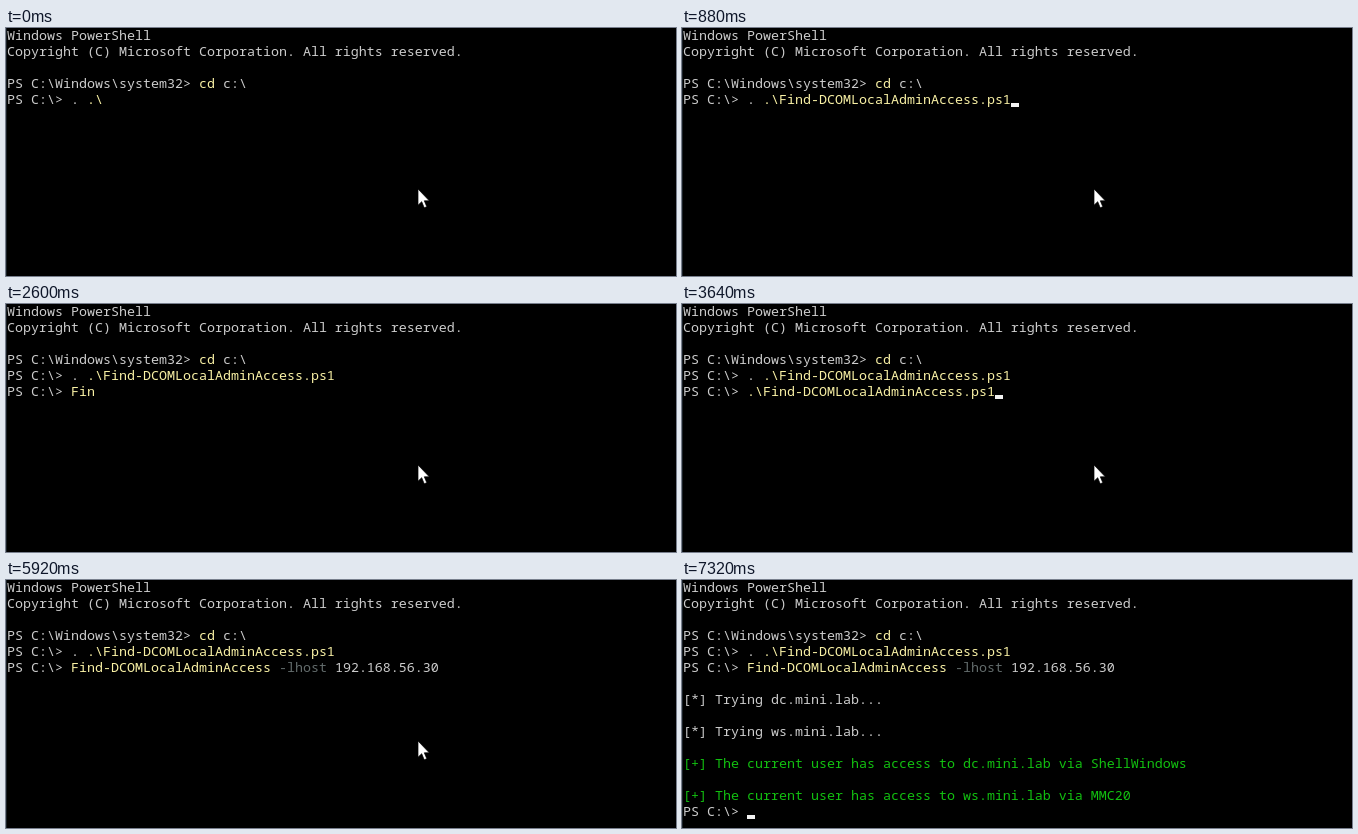
Animation, 670 px wide and 248 px high, one loop 7.36 s. Source, as an HTML page:

```html
<!DOCTYPE html>
<html lang="en">
<head>
<meta charset="utf-8">
<title>Terminal</title>
<style>
html, body { margin: 0; width: 100%; height: 100%; overflow: hidden; background: #000; }
#edge { position: absolute; left: 0; top: 0; width: 1px; height: 100%; background: #182026; }
pre {
  position: absolute; left: 1px; top: -1px; margin: 0; color: #ccc;
  font: 13.333px/16px "Noto Sans Mono", "DejaVu Sans Mono", monospace;
  font-variant-ligatures: none;
}
.cmd { color: #f9f1a5; }
.opt { color: #626b6b; }
.ok { color: #12c010; }
#caret { position: absolute; width: 8px; height: 4px; background: #f2f2f2; }
#mouse { position: absolute; left: 411px; top: 160px; }
</style>
</head>
<body>
<div id="edge"></div>
<pre id="screen"></pre>
<div id="caret"></div>
<svg id="mouse" width="14" height="22" viewBox="0 0 14 22">
  <path d="M1 1V17.2L4.7 13.7L7.2 19.8L9.8 18.7L7.3 12.8H12.3Z" fill="#fff" stroke="#000" stroke-width=".7"/>
</svg>
<script>
const LOOP = 7360, BLINK = 535, CELL = 8, ROW = 16;
const $ = id => document.getElementById(id);
const span = (kind, text) => text && `<span class="${kind}">${text}</span>`;
const cmd = text => span('cmd', text);

// Characters of text typed by time t, one every step ms from start
const typed = (text, t, start, step) =>
  text.slice(0, Math.max(0, Math.floor((t - start) / step) + 1));

const PROMPT = 'PS C:\\&gt; ';
const NAME = 'Find-DCOMLocalAdminAccess';
const HEADER = `Windows PowerShell
Copyright (C) Microsoft Corporation. All rights reserved.

PS C:\\Windows\\system32&gt; ${cmd('cd')} c:\\
`;
const OUTPUT = [
  [6040, '\n[*] Trying dc.mini.lab...\n'],
  [6160, '\n[*] Trying ws.mini.lab...\n'],
  [6320, '\n' + span('ok', '[+] The current user has access to dc.mini.lab via ShellWindows') + '\n'],
  [6960, '\n' + span('ok', '[+] The current user has access to ws.mini.lab via MMC20') + '\n'],
  [7000, PROMPT]
];

function loadLine(t) {
  const file = t < 600 ? typed('Find', t, 120, 120) : NAME + '.ps1';
  return PROMPT + '. ' + cmd('.\\' + file);
}

function callLine(t) {
  if (t < 3200) return PROMPT + cmd(typed('Find', t, 2360, 120));
  if (t < 4240) return PROMPT + cmd(`.\\${NAME}.ps1`);
  const option = typed(' -l', t, 4320, 80) + typed('host', t, 4680, 49);
  return PROMPT + cmd(NAME) + span('opt', option) + typed(' 192.168.56.30', t, 4876, 49);
}

function content(t) {
  let text = HEADER + loadLine(t);
  if (t >= 1600) text += '\n' + callLine(t);
  if (t >= 5960) text += '\n';
  return text + OUTPUT.filter(([at]) => t >= at).map(([, line]) => line).join('');
}

function caretOn(t) {
  const start = t >= 7000 ? 7000 : t >= 3200 ? 3200 : 480;
  return Math.floor((t - start) / BLINK) % 2 === 0;
}

let shown;
function draw(now) {
  const t = now % LOOP, html = content(t);
  if (html !== shown) {
    $('screen').innerHTML = shown = html;
    const lines = $('screen').textContent.split('\n');
    $('caret').style.left = 1 + lines.at(-1).length * CELL + 'px';
    $('caret').style.top = (lines.length - 1) * ROW + 11 + 'px';
  }
  $('caret').style.visibility = caretOn(t) ? 'visible' : 'hidden';
  $('mouse').style.visibility = t < 7160 ? 'visible' : 'hidden';
}

const begin = performance.now();
function tick() {
  draw(performance.now() - begin);
  requestAnimationFrame(tick);
}
tick();
</script>
</body>
</html>
```
